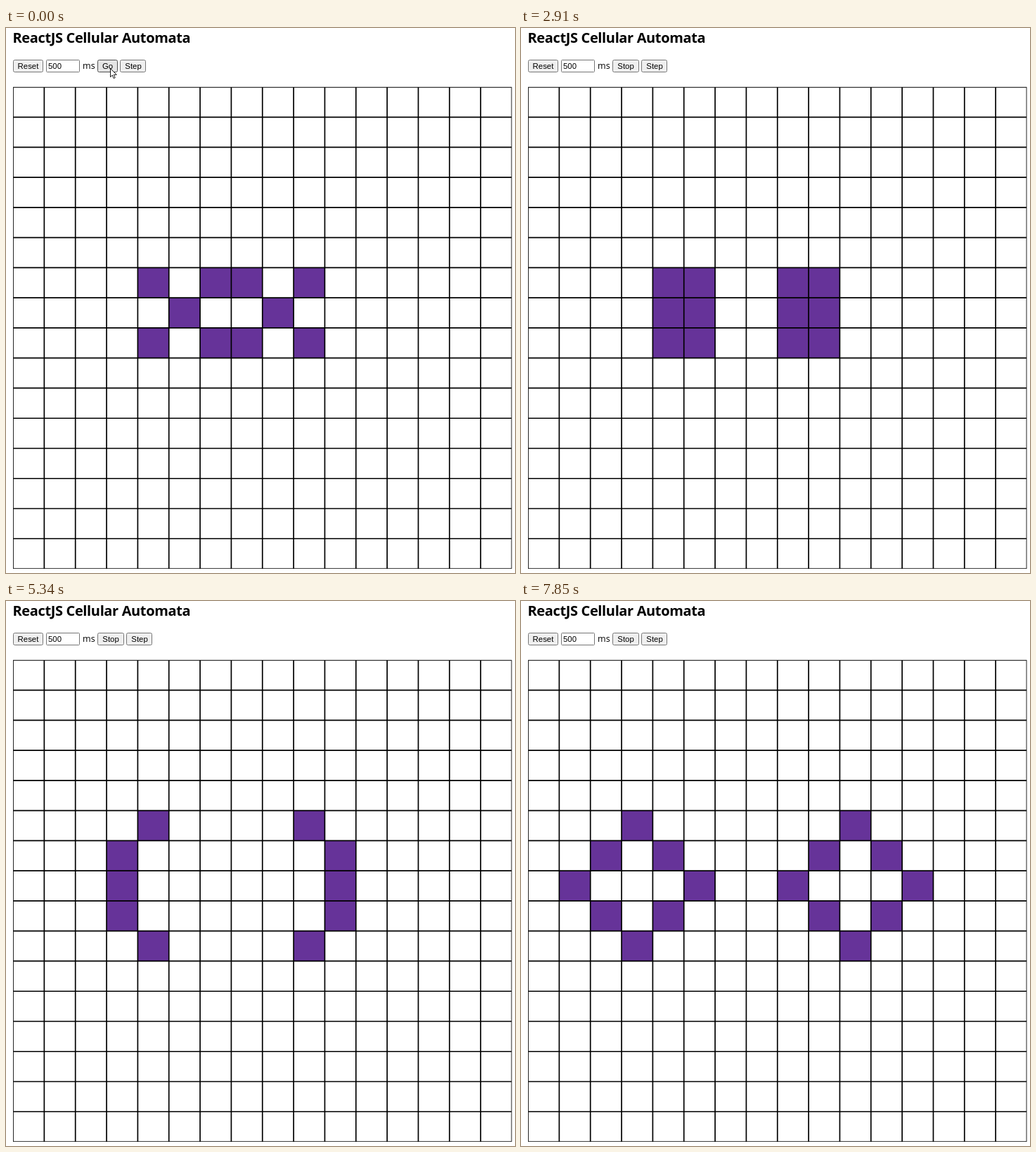
Recreate the animation shown at these times as an HTML page. Size 724 by 774 pixels, loop 8 s.

```html
<!DOCTYPE html>
<html lang="en">
<head>
<meta charset="utf-8">
<title>Cellular Automata</title>
<style>
  html, body { margin: 0; width: 100%; height: 100%; overflow: hidden; background: #fff; }
  svg { display: block; }
  text { font: 11.4px "Liberation Sans", Arial, sans-serif; }
  .title { font: bold 20px "Open Sans", "Noto Sans", sans-serif; letter-spacing: -.36px; }
  .unit { font: 12.5px "Open Sans", "Noto Sans", sans-serif; }
  .box { fill: #efefef; stroke: #767676; }
  .field { fill: #fff; }
  .hover .box { fill: #e5e5e5; stroke: #4f4f4f; }
  .active .box { fill: #f5f5f5; stroke: #8d8d8d; }
  .button text { text-anchor: middle; }
</style>
</head>
<body>
<svg width="724" height="774" viewBox="0 0 724 774">
  <text class="title" x="9.5" y="21">ReactJS Cellular Automata</text>

  <g class="button">
    <rect class="box" x="10.5" y="45.5" width="42" height="17" rx="2"/>
    <text x="31.5" y="58">Reset</text>
  </g>
  <rect class="box field" x="57.5" y="45.5" width="47" height="17" rx="1"/>
  <text x="60" y="58">500</text>
  <text class="unit" x="109" y="57.5">ms</text>
  <g class="button" id="toggle">
    <rect class="box" x="130.5" y="45.5" width="28" height="17" rx="2"/>
    <text y="58"></text>
  </g>
  <g class="button" id="step">
    <rect class="box" x="162.5" y="45.5" width="36" height="17" rx="2"/>
    <text x="181" y="58">Step</text>
  </g>

  <path id="live" fill="#639"/>
  <path id="lines" fill="#000"/>
  <path id="cursor" d="M.5 .5V12.6L3.3 10 5.2 14.5 7.2 13.6 5.3 9.3H9.3Z"
        fill="#fff" stroke="#000" stroke-width=".9"/>
</svg>
<script>
  const LOOP = 8000, SIZE = 16;
  const LEFT = 10.03, TOP = 83.87, CELL_W = 44.34, CELL_H = 42.76, BORDER = .85;
  const STEPS = [1360, 1920, 2350, 2910, 3310, 3860, 4390, 4940, 5340, 5900, 6330, 6860, 7260, 7850];
  const CURSOR = [[0, 148, 57], [1210, 329, 74], [1360, 642, 98], [1510, -50, -50]];
  const BUTTON = [[0, 'hover'], [660, 'active'], [810, 'hover'], [1210, '']];

  const $ = id => document.getElementById(id);
  const rect = (x, y, w, h) => `M${x} ${y}h${w}v${h}h${-w}z`;
  const latest = (keys, t) => keys.filter(key => key[0] <= t).pop();

  // Every cell has its own border, so inner lines are twice as wide as the frame.
  function drawGrid() {
    const width = SIZE * CELL_W, height = SIZE * CELL_H;
    let d = '';
    for (let k = 0; k <= SIZE; k++) {
      const before = k > 0 ? BORDER : 0, size = before + (k < SIZE ? BORDER : 0);
      d += rect(LEFT + k * CELL_W - before, TOP, size, height)
        + rect(LEFT, TOP + k * CELL_H - before, width, size);
    }
    $('lines').setAttribute('d', d);
  }

  // Conway's Game of Life
  function evolve(grid) {
    const at = (r, c) => grid[r] && grid[r][c] ? 1 : 0;
    return grid.map((row, r) => row.map((alive, c) => {
      let n = -alive;
      for (let dr = -1; dr <= 1; dr++)
        for (let dc = -1; dc <= 1; dc++) n += at(r + dr, c + dc);
      return n === 3 || (alive && n === 2) ? 1 : 0;
    }));
  }

  function cellPath(grid) {
    let d = '';
    grid.forEach((row, r) => row.forEach((alive, c) => {
      if (alive) d += rect(LEFT + c * CELL_W, TOP + r * CELL_H, CELL_W, CELL_H);
    }));
    return d;
  }

  function buildGenerations() {
    let grid = Array.from({ length: SIZE }, () => Array(SIZE).fill(0));
    ['#.##.#', '.#..#.', '#.##.#'].forEach((line, r) =>
      [...line].forEach((ch, c) => { grid[6 + r][4 + c] = ch === '#' ? 1 : 0; }));
    const paths = [cellPath(grid)];
    for (const _ of STEPS) paths.push(cellPath(grid = evolve(grid)));
    return paths;
  }

  function drawToolbar(t) {
    const running = t >= 810, toggle = $('toggle');
    const [box, label] = toggle.children;
    toggle.setAttribute('class', 'button ' + latest(BUTTON, t)[1]);
    box.setAttribute('width', running ? 37 : 28);
    label.setAttribute('x', running ? 149 : 144.5);
    label.textContent = running ? 'Stop' : 'Go';
    $('step').setAttribute('transform', `translate(${running ? 9 : 0} 0)`);
  }

  drawGrid();
  const generations = buildGenerations();
  const start = performance.now();

  function frame() {
    const t = Math.max(0, performance.now() - start) % LOOP;
    $('live').setAttribute('d', generations[STEPS.filter(s => s <= t).length]);
    drawToolbar(t);
    const [, x, y] = latest(CURSOR, t);
    $('cursor').setAttribute('transform', `translate(${x} ${y})`);
    requestAnimationFrame(frame);
  }
  frame();
</script>
</body>
</html>
```
